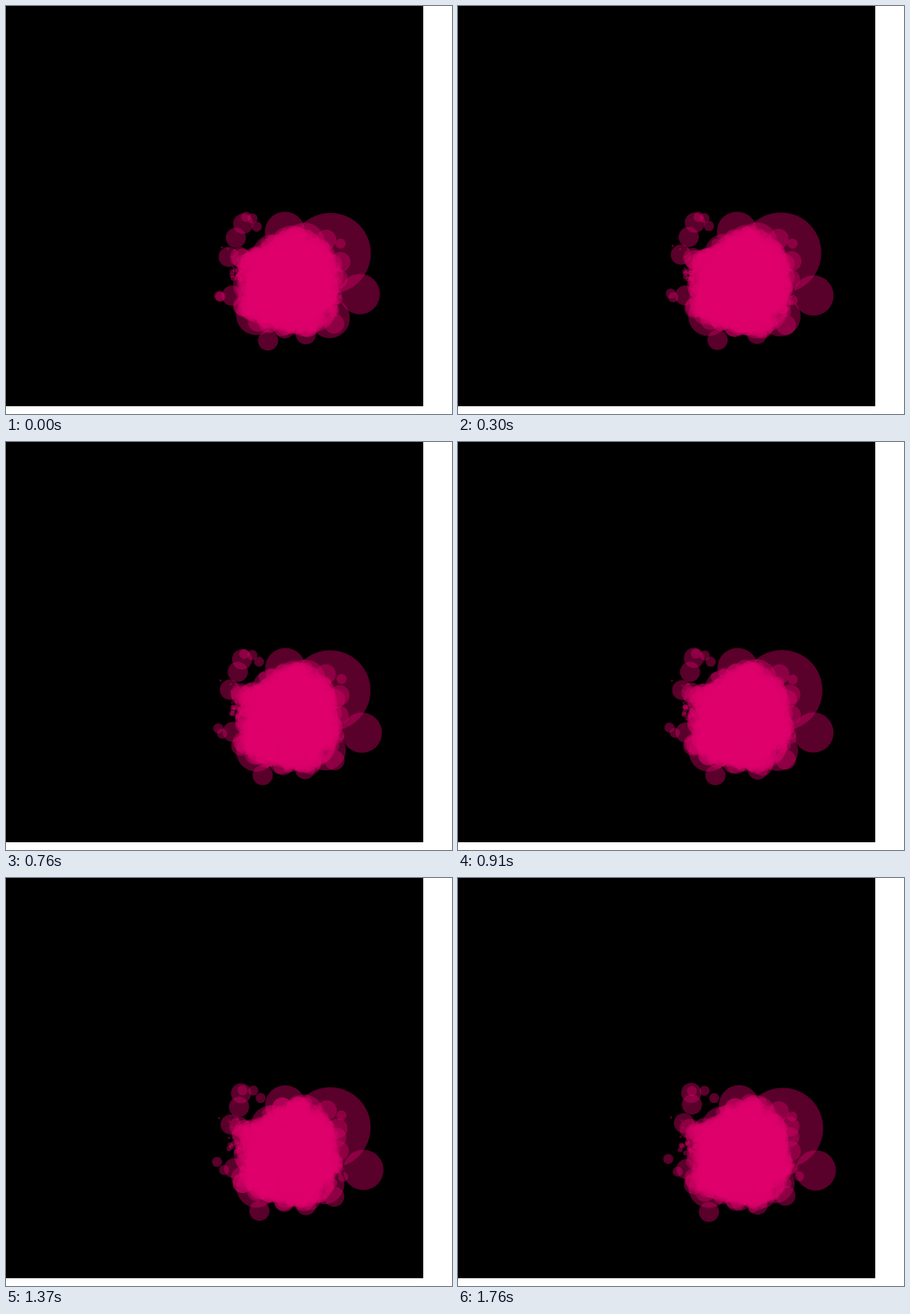
Recreate the animation shown at these times as an HTML page with a canvas. Size 574 by 526 pixels, loop 1.84 s.

```html
<!DOCTYPE html>
<html lang="en">
<head>
<meta charset="utf-8">
<title>Restless cluster</title>
<style>
  html, body { margin: 0; width: 100%; height: 100%; overflow: hidden; background: #fff; }
  canvas { display: block; }
</style>
</head>
<body>
<canvas id="stage" width="574" height="526"></canvas>
<script>
const ctx = document.getElementById('stage').getContext('2d');
const LOOP = 1840, STEPS = 24;
const HUGE = 52, LARGE = 26, MEDIUM = 13, SMALL = 6.5, TINY = 3.2, SPECK = 1.4;
const CENTER = { x: 366, y: 357 };
const discs = [];

let seed = 20417;
function random() {
  seed = (seed * 1664525 + 1013904223) % 4294967296;
  return seed / 4294967296;
}
const jitter = amount => (random() + random() + random() - 1.5) * amount;

// A disc that drifts steadily through its mean position, trembling a little.
function drifter(r, x, y, dx = 0, dy = 0) {
  const path = Array.from({ length: STEPS }, (_, step) => {
    const u = step / (STEPS - 1) - 0.5;
    return [x + dx * u + jitter(1.2), y + dy * u + jitter(1.2)];
  });
  discs.push({ r, path });
}

// A disc on a random walk.
function walker(r, x, y, pace) {
  const path = Array.from({ length: STEPS }, () => [x += jitter(pace), y += jitter(pace)]);
  discs.push({ r, path });
}

function scatter(count, r, cx, cy, spread, pace = 1.8) {
  for (let i = 0; i < count; i++) {
    const angle = random() * Math.PI * 2, distance = spread * Math.sqrt(random());
    walker(r, cx + distance * Math.cos(angle), cy + distance * Math.sin(angle), pace);
  }
}

// The dense mass, frayed towards its rim.
scatter(9, HUGE, CENTER.x, CENTER.y, 8, 0.8);
scatter(42, LARGE, CENTER.x, CENTER.y, 49, 1.2);
scatter(115, MEDIUM, CENTER.x, CENTER.y, 61);
scatter(150, SMALL, CENTER.x, CENTER.y, 67);

// Loose crumbs on the left.
scatter(8, MEDIUM, 312, 328, 12);
scatter(10, MEDIUM, 320, 392, 17);
scatter(14, TINY, 296, 348, 8);
scatter(6, SPECK, 284, 325, 18);

// The discs that stand out around the mass.
drifter(HUGE, 417, 320.5, 1, 5);
drifter(LARGE, 458, 374.5, 3, 5);
drifter(LARGE, 360, 292, 1, 3);
drifter(LARGE, 412, 397, -11, -9);
drifter(LARGE, 322, 398.5);
drifter(LARGE, 384, 306);
drifter(MEDIUM, 330, 430.5, -14, 0);
drifter(MEDIUM, 288.5, 319, 4, -7);
drifter(MEDIUM, 299, 296, 6, -7);
drifter(MEDIUM, 303.5, 278.5, -6, -4);
drifter(MEDIUM, 293, 374, 4, 3);
drifter(MEDIUM, 385, 422.5);
drifter(MEDIUM, 422, 410.5);
drifter(MEDIUM, 428, 326, -4, -9);
drifter(MEDIUM, 413, 300);
drifter(MEDIUM, 428, 352);
drifter(SMALL, 306, 273, -7, 4);
drifter(SMALL, 318, 274);
drifter(SMALL, 326, 284, 8, 0);
drifter(SMALL, 272.5, 368, -4, -10);
drifter(SMALL, 279, 376, 7, 4);
drifter(SMALL, 431, 306);

function render(step) {
  ctx.fillStyle = '#fff';
  ctx.fillRect(0, 0, 574, 526);
  ctx.fillStyle = '#000';
  ctx.fillRect(0, 0, 537, 516);
  ctx.fillStyle = 'rgba(223, 0, 108, 0.4)';
  for (const { r, path } of discs) {
    ctx.beginPath();
    ctx.arc(...path[step], r, 0, Math.PI * 2);
    ctx.fill();
  }
}

let shown = -1;
function tick() {
  // Steps start on whole hundredths of a second.
  const t = Math.floor(performance.now() % LOOP / 10) * 10 + 9.99;
  const step = Math.min(STEPS - 1, Math.floor(t * STEPS / LOOP));
  if (step !== shown) render(shown = step);
  requestAnimationFrame(tick);
}
tick();
</script>
</body>
</html>
```
